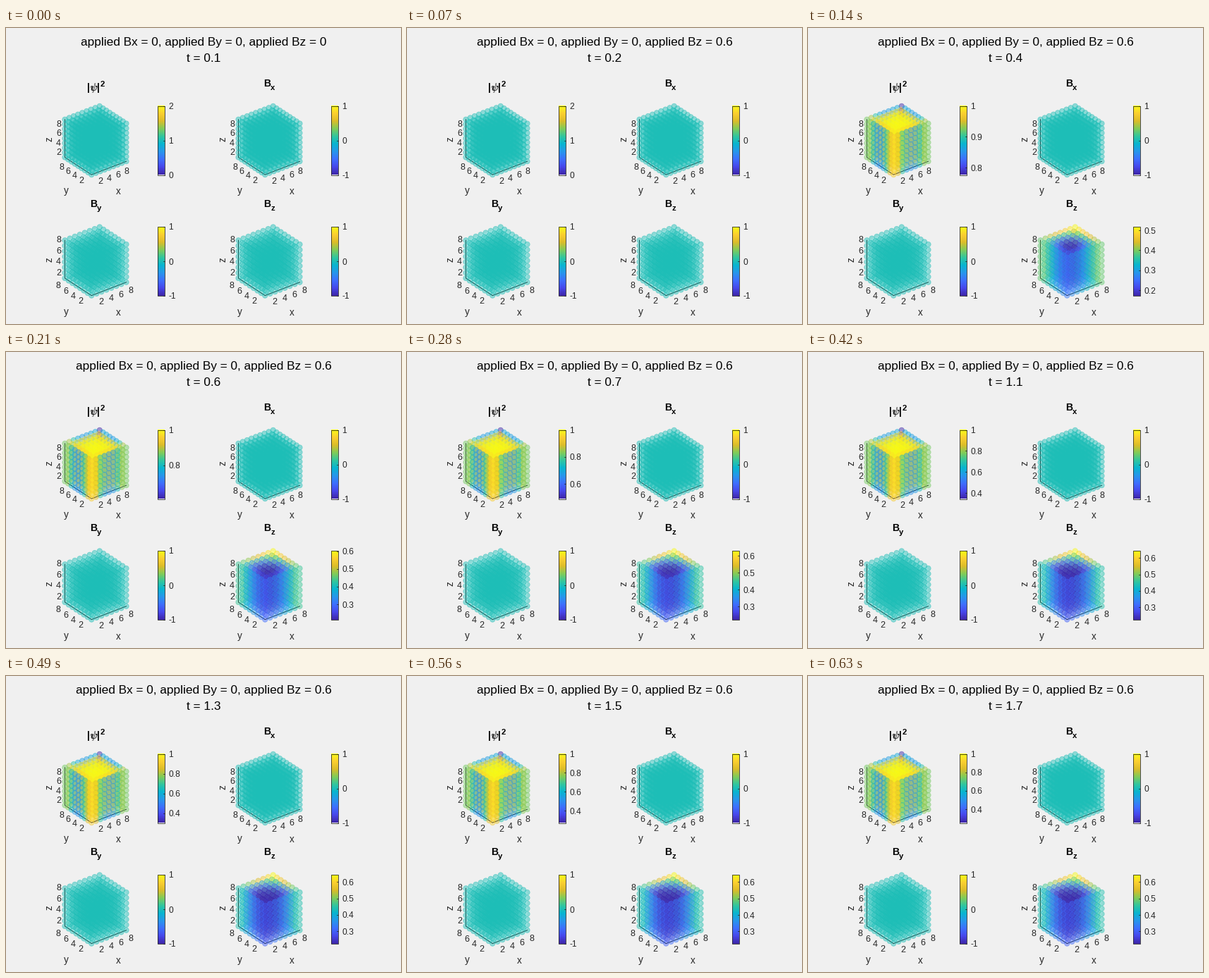
Animation, 560 px wide and 420 px high, one loop 0.7 s. Source, as a matplotlib script:

```python
import numpy as np
import matplotlib.pyplot as plt
from matplotlib.animation import FuncAnimation
from matplotlib.colors import LinearSegmentedColormap

W, H, DPI = 560, 420, 100
FRAMES, DT = 10, .185
INK = "#262626"
plt.rcParams["font.family"] = "Liberation Sans"
plt.rcParams["mathtext.fontset"] = "cm"

PARULA = LinearSegmentedColormap.from_list("parula", (
    "#3e26a8 #4747eb #3e6fff #2797eb #08b5d0 "
    "#31c69f #81cc59 #dcbd29 #fccf30 #f9fb15").split())

# Orthographic view, azimuth -37.5, elevation 30
SIDE, AZ, EL = 62, np.radians(37.5), np.radians(30)
EX = SIDE * np.array([np.cos(AZ), -np.sin(AZ) * np.sin(EL)])
EY = SIDE * np.array([-np.sin(AZ), -np.cos(AZ) * np.sin(EL)])
EZ = SIDE * np.array([0, -np.cos(EL)])

fig = plt.figure(figsize=(W / DPI, H / DPI), dpi=DPI, facecolor="#f0f0f0")
ax = fig.add_axes([0, 0, 1, 1])
ax.axis("off")


def pt(px):
    return px * 72 / DPI


def label(x, y, s, px=12.5, ha="center", va="center_baseline", color=INK, **kw):
    return ax.text(x, y, s, fontsize=pt(px), ha=ha, va=va, color=color, **kw)


def title(x, y, s, px=14, ha="left", **kw):
    return label(x, y, s, px, ha, "baseline", "black", **kw)


def psi_drop(u, v):
    """Relative loss of density: sharp at the walls, weaker near most edges."""
    wall = lambda d: np.exp(-16 * d)
    soft = lambda d: np.exp(-(4 * d) ** 2)

    def side(a, b):
        low = wall(a) * (.7 - .64 * soft(b) - .5 * soft(1 - b))
        return low + wall(1 - a) * (.65 - .5 * soft(b) - .15 * soft(1 - b))

    return side(u, v) + side(v, u)


def bz_rise(u, v, settled):
    """Field grows towards the far edge and is pushed out of the core."""
    near = .25 - .07 * settled
    slope = 1 + .3 * settled
    rim = lambda m: near + (1 - near) * m ** slope
    core = (16 * u * (1 - u) * v * (1 - v)) ** (1 - .4 * settled)
    return rim((u + v) / 2) - rim(.5) * core


class Panel:
    def __init__(self, cx, cy, n):
        self.origin = np.array([cx, cy]) - (EX + EY + EZ) / 2
        self.n = n
        g = np.linspace(0, 1, n)
        u, v, w = (a.ravel() for a in np.meshgrid(g, g, g))
        depth = (u * np.sin(AZ) + v * np.cos(AZ)) * np.cos(EL) - w * np.sin(EL)
        order = np.argsort(-depth, kind="stable")
        self.u, self.v = u[order], v[order]
        p = self.at(*(a[order, None] for a in (u, v, w)))
        self.dots = ax.scatter(*p.T, s=pt(7.4) ** 2, linewidths=pt(.8), zorder=3)
        self.draw_box(cx, cy)
        self.draw_bar(cx + 88, cy)
        self.ticks = []

    def at(self, u, v, w):
        return self.origin + u * EX + v * EY + w * EZ

    def draw_box(self, cx, cy):
        ring = [(0, 1, 1), (0, 1, 0), (0, 0, 0), (1, 0, 0), (1, 0, 1), (1, 1, 1)]
        ring = np.array([self.at(*c) for c in ring])
        ax.add_patch(plt.Polygon(ring, fc="white", ec="none", zorder=1))
        ax.plot(*ring[:4].T, color="black", lw=pt(1), zorder=2)
        for k in (2, 4, 6, 8):
            f = (k - 1) / (self.n - 1)
            for p, d in ((self.at(f, 0, 0), (6.7, 11)),
                         (self.at(0, f, 0), (-9.7, 10)),
                         (self.at(0, 1, f), (-9, -1.3))):
                label(*(p + d), str(k))
        label(cx + 32, cy + 71, "x", 13.5)
        label(cx - 42, cy + 70, "y", 13.5)
        label(cx - 66, cy - 2, "z", 13.5, va="center", rotation=90)

    def draw_bar(self, x, cy):
        self.right, self.bottom, self.height = x + 10, cy + 49, 98
        top = cy - 49
        ax.imshow(np.linspace(0, 1, 256)[:, None], cmap=PARULA, origin="lower",
                  extent=(x, x + 10, self.bottom, top), aspect="auto")
        ax.add_patch(plt.Rectangle((x, top), 10, self.height, fill=False,
                                   ec=INK, lw=pt(.8), zorder=3))

    def show(self, values, lo, hi, step):
        rgba = PARULA((values - lo) / (hi - lo))
        rgba[:, 3] = .47
        self.dots.set_facecolors(rgba)
        self.dots.set_edgecolors(rgba)
        for t in self.ticks:
            t.remove()
        self.ticks = []
        for k in range(int(np.ceil(lo / step)), int(hi / step + 1e-6) + 1):
            y = self.bottom - (k * step - lo) / (hi - lo) * self.height
            self.ticks += ax.plot([self.right - 2, self.right], [y, y],
                                  color=INK, lw=pt(.8), zorder=3)
            self.ticks.append(label(self.right + 5.5, y, f"{k * step:g}", 12, "left"))


def b_title(x, y, sub):
    title(x - 8, y, "B", weight="bold")
    title(x + 2.2, y + 5.5, sub, 11.2, weight="bold")


psi, bx = Panel(127, 159.5, 9), Panel(373, 159.5, 9)
by, bz = Panel(127, 331, 8), Panel(373, 331, 8)
ax.set_xlim(0, W)
ax.set_ylim(H, 0)

for x in (117.3, 131.3):
    title(x, 88.5, "|", 13.5, "center", weight="bold")
for x in (124.2, 124.8):
    title(x, 88.5, r"$\psi$", 15, "center")
title(136.3, 83, "2", 11.2, "center", weight="bold")
b_title(373, 82.8, "x")
b_title(127, 253.8, "y")
b_title(373, 253.8, "z")

head = title(280, 25.5, "", 17.2, "center")
clock = title(280, 47.5, "", 17.2, "center")

for p in (bx, by):
    p.show(0 * p.u, -1, 1, 1)


def update(i):
    field = .6 if i else 0
    head.set_text(f"applied Bx = 0, applied By = 0, applied Bz = {field}")
    clock.set_text(f"t = {max(.1, DT * i):.1f}")
    if i < 2:
        psi.show(1 + 0 * psi.u, 0, 2, 1)
        bz.show(0 * bz.u, -1, 1, 1)
        return
    k = i - 2
    lo = .2 + .577 * np.exp(-k / 2.9)
    psi.show(1 - (1 - lo) * psi_drop(psi.u, psi.v), lo, 1, .2 if lo < .7 else .1)
    lo = .224 - .052 * np.exp(-1.5 * k)
    hi = .645 - .127 * np.exp(-1.1 * k)
    rise = bz_rise(bz.u, bz.v, 1 - np.exp(-k / 1.5))
    bz.show(lo + (hi - lo) * rise, lo, hi, .1)


anim = FuncAnimation(fig, update, frames=FRAMES, interval=70,
                     repeat=True, repeat_delay=0, init_func=lambda: None)
plt.show()
```
